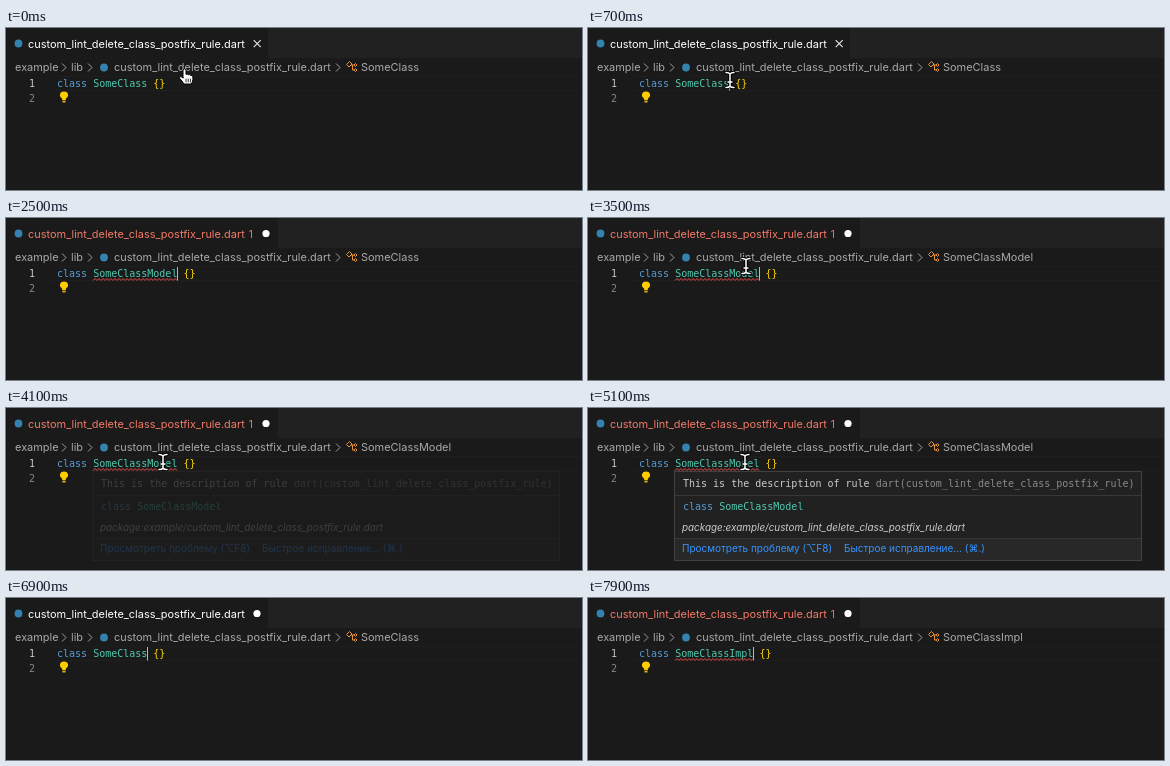
An HTML page for the animation above (8000 ms loop, 576x162 px).

```html
<!DOCTYPE html>
<html lang="en">
<head>
<meta charset="utf-8">
<title>Editor lint demo</title>
<style>
  html, body { margin: 0; width: 576px; height: 162px; overflow: hidden; background: #1a1a1a; }
  svg { display: block; }
  text { white-space: pre; }
  .ui { font: 10.96px Inter, "Open Sans", sans-serif; }
  .code { font: 10px "DejaVu Sans Mono", "Liberation Mono", monospace; }
  .crumb { fill: #a9a9a9; }
  .key { fill: #569cd6; }
  .type { fill: #4ec9b0; }
  .brace { fill: #ffd700; }
  .path { font-size: 9.9px; font-style: italic; fill: #ccc; }
  .link { font: 10px Inter, "DejaVu Sans", sans-serif; fill: #3794ff; }
  .line { fill: none; stroke-width: 1; }
</style>
</head>
<body>
<svg width="576" height="162" viewBox="0 0 576 162">
  <defs>
    <path id="chevron" class="line" d="M-2-4L2 0L-2 4" stroke="#a0a0a0"/>
    <path id="beam" d="M-4-7.5Q-1-7.5 0-6Q1-7.5 4-7.5M0-6V6M-4 7.5Q-1 7.5 0 6Q1 7.5 4 7.5M-2 2H2"/>
    <circle id="file" r="3.9" fill="#3482b0"/>
  </defs>

  <rect width="576" height="162" fill="#1a1a1a"/>
  <rect id="bar" y="0" width="320" height="30" fill="#212121"/>
  <use href="#file" x="12.5" y="15.5"/>
  <text id="title" class="ui" x="22" y="19.5"><tspan>custom_lint_delete_class_postfix_rule.dart</tspan><tspan id="badge" dx="4" font-size="10">1</tspan></text>
  <path id="close" class="line" d="M247.7 12.2l7 7M254.7 12.2l-7 7" stroke="#e0e0e0" style="stroke-width:1.2"/>
  <circle id="dirty" cy="15.5" r="3.6" fill="#fff"/>

  <g class="ui crumb">
    <text x="9" y="43">example</text>
    <use href="#chevron" x="58" y="39.5"/>
    <text x="65" y="43">lib</text>
    <use href="#chevron" x="84" y="39.5"/>
    <use href="#file" x="98" y="39.5"/>
    <text x="108" y="43">custom_lint_delete_class_postfix_rule.dart</text>
    <use href="#chevron" x="332" y="39.5"/>
    <path class="line" d="M340.5 36.5l3-3l2.5 2.5l-3 3zM345 37h3M346.5 37v5h1.5M348 37l1.5-1.5l1.5 1.5l-1.5 1.5zM348 42l1.5-1.5l1.5 1.5l-1.5 1.5z" stroke="#e8933a"/>
    <text id="crumb" x="355" y="43"></text>
  </g>

  <path class="line" d="M44 48.5H576M44 62.5H576" stroke="#1e1e1e"/>
  <g class="code">
    <text x="23" y="59" fill="#c6c6c6">1</text>
    <text x="23" y="74" fill="#858585">2</text>
    <text x="51" y="59"><tspan class="key">class </tspan><tspan id="name" class="type"></tspan><tspan class="brace"> {}</tspan></text>
  </g>
  <path id="wave" class="line" stroke="#f14c4c"/>
  <path d="M56.2 72V70.8Q53.9 69.2 53.9 67.6A4.1 4 0 0 1 62.1 67.6Q62.1 69.2 59.8 70.8V72Z" fill="#fc0"/>
  <path d="M56.4 72.6h3.2v1.9h-3.2z" fill="#d8ab1c"/>
  <rect id="caret" x="0" y="49" width="1" height="13.5" fill="#b8b8b8"/>

  <g id="hover">
    <rect x="86.5" y="63.5" width="467" height="89" fill="#212121" stroke="#414141"/>
    <rect x="87" y="131" width="466" height="21" fill="#282829"/>
    <path class="line" d="M87 87.5H553M87 130.5H553" stroke="#383838"/>
    <text class="code" x="95" y="79" fill="#ccc">This is the description of rule <tspan fill="#8b8b8b">dart(custom_lint_delete_class_postfix_rule)</tspan></text>
    <text class="code" x="95" y="101.5"><tspan class="key">class </tspan><tspan class="type">SomeClassModel</tspan></text>
    <text class="ui path" x="94" y="122.5">package:example/custom_lint_delete_class_postfix_rule.dart</text>
    <text class="link" x="94" y="144">Просмотреть проблему (⌥F8)</text>
    <text class="link" x="256" y="144">Быстрое исправление... (⌘.)</text>
  </g>

  <g id="mouse" stroke-linecap="round" stroke-linejoin="round">
    <g id="text-cursor" fill="none">
      <use href="#beam" stroke="#000" stroke-width="3.4"/>
      <use href="#beam" stroke="#fff" stroke-width="1.5"/>
    </g>
    <g id="hand" stroke="#000">
      <path d="M-3 0V-6Q-1.5-8.4 0-6V-1.6Q1.2-2.8 2.4-1.2Q3.8-2.2 4.7-.6Q6.6-1 6.9.9V3.6Q6.9 5.4 5.3 8H-2Q-4 4.8-6.4 2.3Q-6.8-.8-3 1.8Z" fill="#fff"/>
      <path class="line" d="M0 3v3M2.2 3v3M4.4 3v3" style="stroke-width:.8"/>
    </g>
  </g>
</svg>

<script>
const LOOP = 8000, STEM = "SomeClass", CHAR = 6.02, NAME_X = 87.12;
const $ = id => document.getElementById(id);

// [time, value] steps; each value holds until the next one
const suffix = [
  [0, ""], [1700, "M"], [1900, "Mo"], [2000, "Mod"], [2200, "Mode"], [2400, "Model"],
  [5800, "Mode"], [5900, "Mod"], [6100, "Mo"], [6300, "M"], [6500, ""],
  [7000, "I"], [7100, "Im"], [7200, "Imp"], [7500, "Impl"]
];
const crumbs = [[0, ""], [2700, "Model"], [6900, ""], [7800, "Impl"]];
const errors = [[0, false], [2500, true], [6200, false], [7700, true]];
const cursor = [[0, "hand"], [300, "beam"], [1700, ""], [2800, "beam"], [5800, ""]];
const blinkFrom = [[0, -800], [700, 700], ...suffix.slice(1).map(([t]) => [t, t])];
const route = [
  [0, 180, 48], [100, 180, 48], [700, 142, 52], [2800, 142, 52],
  [3500, 158, 48], [3700, 157, 54], [5100, 157, 54], [5500, 188, 58], [LOOP, 188, 58]
];

const at = (steps, t) => steps.findLast(s => s[0] <= t)[1];
const clamp = v => Math.max(0, Math.min(1, v));
const ease = v => v * v * (3 - 2 * v);
const show = (id, on) => $(id).style.display = on ? "" : "none";

function position(t) {
  const i = route.findLastIndex(p => p[0] <= t);
  const a = route[i], b = route[i + 1] || a;
  const k = ease(clamp((t - a[0]) / (b[0] - a[0] || 1)));
  return [a[1] + (b[1] - a[1]) * k, a[2] + (b[2] - a[2]) * k];
}

function wave(from, to) {
  let d = `M${from} 62.5`;
  for (let x = from + 2, i = 0; x <= to; x += 2, i++) d += `L${x} ${i % 2 ? 62.5 : 60.5}`;
  return d;
}

function render(t) {
  const name = STEM + at(suffix, t), end = NAME_X + name.length * CHAR;
  const error = at(errors, t), dirty = t >= 1700, shape = at(cursor, t);

  $("name").textContent = name;
  $("crumb").textContent = STEM + at(crumbs, t);
  $("title").setAttribute("fill", error ? "#f27a68" : "#fff");
  show("badge", error);
  show("close", !dirty);
  show("dirty", dirty);
  $("dirty").setAttribute("cx", error ? 260 : 251);
  $("bar").setAttribute("x", error ? 272 : 262);

  show("wave", error);
  $("wave").setAttribute("d", wave(87, end));
  $("caret").setAttribute("x", Math.round(end - 0.4));
  show("caret", (t - at(blinkFrom, t)) % 1000 < 500);

  $("hover").style.opacity = t < 5300 ? clamp((t - 4050) / 250) : 0;
  $("mouse").setAttribute("transform", `translate(${position(t)})`);
  show("text-cursor", shape === "beam");
  show("hand", shape === "hand");
}

const start = performance.now();
function tick() {
  render((performance.now() - start) % LOOP);
  requestAnimationFrame(tick);
}
render(0);
requestAnimationFrame(tick);
</script>
</body>
</html>
```
